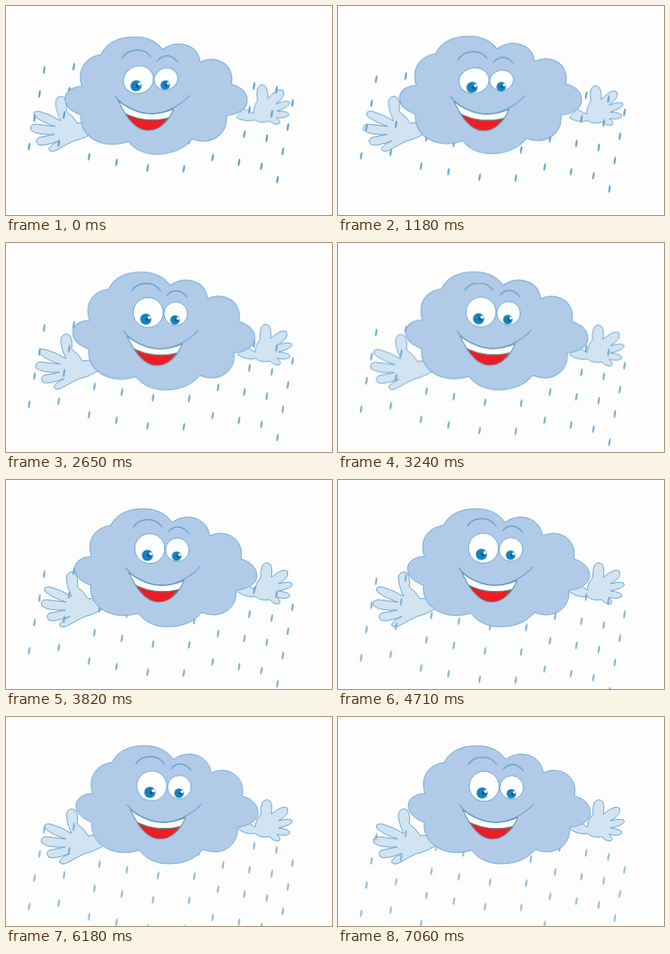
Write an HTML page that moves like this. It is 408 by 262 pixels and loops after 7.35 s.

```html
<!DOCTYPE html>
<html lang="en">
<head>
<meta charset="utf-8">
<title>Rain cloud</title>
<style>
html, body { margin: 0; width: 100%; height: 100%; overflow: hidden; background: #fdfdfd; }
svg { display: block; width: 100vw; height: 100vh; }
path, circle, ellipse { stroke-linejoin: round; stroke-linecap: round; }

/* 25 held poses per loop; each segment steps once per pose */
.move { animation: 7350ms -5ms infinite; }
#left { animation-name: left; }
#right { animation-name: right; transform-origin: 318px 130px; }
#cloud { animation-name: cloud; transform-origin: 200px 0; }
#face { animation-name: face; }
#eyes { animation-name: eyes; transform-origin: 183px 106px; }
#gaze { animation-name: gaze; transform-origin: 181px 0; }
#rain { animation-name: rain; animation-timing-function: steps(25); }

@keyframes rain {
  from { transform: none; opacity: 1; }
  to { transform: translateY(73px); opacity: .65; }
}
@keyframes cloud {
  0% { transform: translate(-14px, 2px) skewY(-1.6deg); animation-timing-function: steps(4); }
  16% { transform: translate(-11px, 1.2px) skewY(-1.5deg); animation-timing-function: steps(5); }
  36% { transform: translate(-4.5px, .3px) skewY(-.4deg); animation-timing-function: steps(4); }
  52% { transform: translate(-2px, 0) skewY(0deg); animation-timing-function: steps(3); }
  64% { transform: translate(-1px, 0) skewY(0deg); animation-timing-function: steps(9); }
  100% { transform: translate(0, 0) skewY(0deg); }
}
@keyframes face {
  0% { transform: translate(-15.3px, 3px); animation-timing-function: steps(4); }
  16% { transform: translate(-11px, 3.4px); animation-timing-function: steps(5); }
  36% { transform: translate(-4.5px, .6px); animation-timing-function: steps(4); }
  52% { transform: translate(-2.3px, 0); animation-timing-function: steps(3); }
  64% { transform: translate(-1px, 0); animation-timing-function: steps(9); }
  100% { transform: translate(0, 0); }
}
@keyframes eyes {
  0% { transform: translate(-17.3px, 4px) skewY(-4deg) scaleY(.92); animation-timing-function: steps(4); }
  16% { transform: translate(-12.7px, 4px) skewY(-3deg) scaleY(.86); animation-timing-function: steps(5); }
  36% { transform: translate(-5px, .2px) skewY(0deg) scaleY(1); animation-timing-function: steps(4); }
  52% { transform: translate(-3px, -1px) skewY(0deg) scaleY(1); animation-timing-function: steps(3); }
  64% { transform: translate(-1px, -1.5px) skewY(0deg) scaleY(1); animation-timing-function: steps(9); }
  100% { transform: translate(0, 0) skewY(0deg) scaleY(1); }
}
@keyframes gaze {
  0% { transform: translate(-17.7px, 4.5px) skewY(-3deg); animation-timing-function: steps(4); }
  16% { transform: translate(-12.7px, 6.5px) skewY(-3deg); animation-timing-function: steps(5); }
  36% { transform: translate(-5.5px, 0) skewY(0deg); animation-timing-function: steps(4); }
  52% { transform: translate(-3.5px, -1px) skewY(0deg); animation-timing-function: steps(3); }
  64% { transform: translate(-1px, -2.3px) skewY(0deg); animation-timing-function: steps(9); }
  100% { transform: translate(0, 0) skewY(0deg); }
}
@keyframes left {
  0% { transform: translate(-13.5px, -2px); animation-timing-function: steps(4); }
  16% { transform: translate(-12.5px, -2px); animation-timing-function: steps(5); }
  36% { transform: translate(-7px, -1px); animation-timing-function: steps(4); }
  52%, 100% { transform: none; }
}
@keyframes right {
  0% { transform: translate(-3px, -4px) rotate(-8deg); animation-timing-function: steps(4); }
  16% { transform: translate(-1.5px, -3px) rotate(-7deg); animation-timing-function: steps(5); }
  36% { transform: translate(-.5px, -1.5px) rotate(-2.5deg); animation-timing-function: steps(4); }
  52%, 100% { transform: translate(0, 0) rotate(0deg); }
}
</style>
</head>
<body>
<svg viewBox="0 0 408 262" preserveAspectRatio="none">
  <defs>
    <path id="mouth" d="M156 116 Q190 142 225 126 C219 141 208 153 193 153 C179 153 167 140 156 116Z"/>
    <clipPath id="inside"><use href="#mouth"/></clipPath>
  </defs>

  <g fill="#d2e3f1" stroke="#5fa4d3">
    <path id="left" class="move" d="M126 159 Q110 169 99 171 Q88 176 80 181 Q70 187 67 182 Q67 177 80 171
      Q62 178 54 176 Q49 171 54 167 L74 163 Q52 164 45 158 Q42 151 50 150 L75 153 Q59 148 49 140 Q46 133 55 134
      Q70 138 82 146 Q74 128 76 120 Q80 112 87 117 Q91 124 89 134 Q98 140 103 149 L118 147Z"/>
    <path id="right" class="move" d="M290 140 Q300 148 312 146 Q318 152 330 150 Q336 157 342 155 Q345 152 339 147
      Q351 150 355 146 Q357 141 341 139 Q357 136 358.500 131 Q358 126 341 130 Q356 122 352 114 Q346 110 332 122
      Q334 112 331 106 Q326 101 321 107 Q318 114 319 122 Q312 130 312 138 L300 130Z"/>
  </g>

  <g id="rain" class="move" fill="#68a3d0"></g>

  <path id="cloud" class="move" fill="#b1cae8" stroke="#6aaad6" d="M133 57 C140 42 156 36 174 36 C190 36 202 42 210 53
    C228 40 254 47 257 70 C278 60 301 75 296 99 C308 102 316 110 316 120 C316 130 304 137 290 138
    C292 160 272 176 247 166 C236 179 222 184 204 184 C188 184 176 178 167 167
    C136 177 105 160 108 132 C97 128 88 121 88 111 C88 103 96 96 109 96 C102 75 114 59 133 57Z"/>

  <g id="face" class="move" fill="none" stroke="#4e9bcd" stroke-width="1.1">
    <use href="#mouth" fill="#fff" stroke="none"/>
    <g clip-path="url(#inside)" stroke="none">
      <path fill="#806259" d="M159 129 Q188 146 228 135 V158 H159Z"/>
      <path fill="#ee1c24" d="M159 129 Q186 146 217 138 Q207 143 209 158 H159Z"/>
      <path fill="none" stroke="#71858c" d="M159 129 Q188 146 222 136.500"/>
    </g>
    <use href="#mouth" stroke="#6292aa"/>
    <path d="M152 110 Q157 117 163 121 Q192 140 222 126 Q236 119 245 109"/>
  </g>

  <g id="eyes" class="move" fill="#fff" stroke="#5fa4d3">
    <circle cx="183" cy="87" r="18.800"/>
    <circle cx="217.500" cy="88.500" r="14.800"/>
  </g>
  <g id="gaze" class="move">
    <path fill="none" stroke="#4e9bcd" stroke-width="1.1" d="M163 60 C170 48 190 47 199 60 M207 66 C213 58 224 57 232 68"/>
    <g id="pupil" transform="translate(180.500 95.500)">
      <circle r="7" fill="#1681bb"/>
      <circle cx="2" r="2.200" fill="#0b517f"/>
      <circle cx="4.300" cy="-2" r="2.100" fill="#fff"/>
    </g>
    <use href="#pupil" transform="translate(63.600 15.300) scale(.85)"/>
  </g>
</svg>
<script>
// Each slanted column holds four drops, listed by its lowest one.
const columns = [[29, 176], [66, 172], [104, 189], [138.3, 196], [177.3, 203],
  [222.6, 204], [258.7, 190], [291.7, 196], [319.7, 201], [339.8, 217.5]];
const spacing = [[0, 0], [6.7, -35.3], [13, -65.8], [18.8, -95.8]];

const drop = (x, y) =>
  `<ellipse rx="1.3" ry="4.9" transform="translate(${x} ${y}) rotate(9)"/>`;

document.getElementById('rain').innerHTML = columns
  .flatMap(([x, y]) => spacing.map(([dx, dy]) => drop(x + dx, y + dy)))
  .join('');
</script>
</body>
</html>
```
